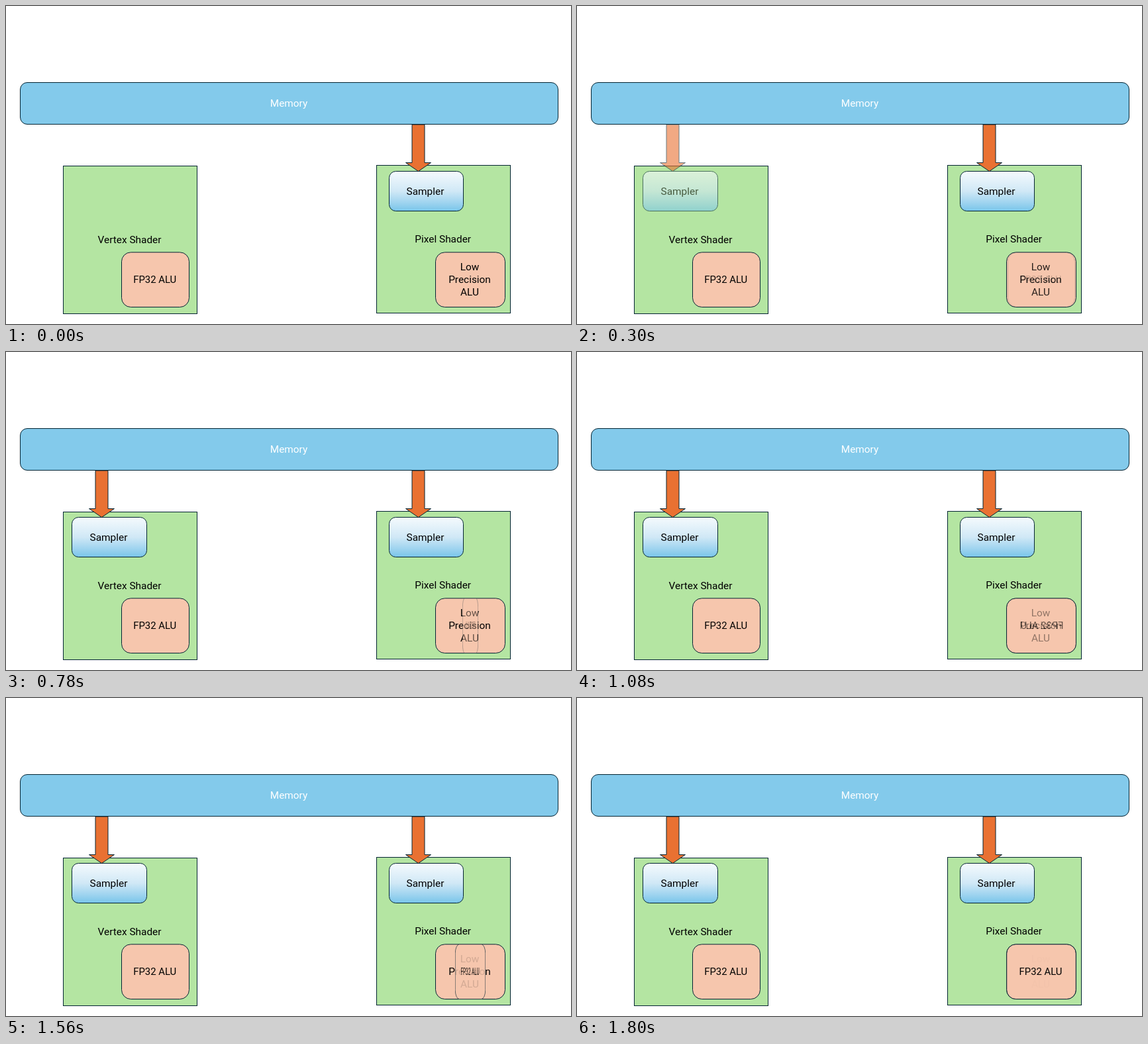
Recreate the animation shown at these times as an HTML page. Size 853 by 480 pixels, loop 1.86 s.

```html
<!DOCTYPE html>
<html lang="en">
<head>
<meta charset="utf-8">
<title>Shader pipeline</title>
<style>
  html, body { margin: 0; width: 100%; height: 100%; overflow: hidden; background: #fff; }
  svg { display: block; width: 853px; height: 480px; }
  rect, .arrow { stroke: #042433; stroke-width: 1; }
  text { font: 15.4px Roboto, "Open Sans", sans-serif; text-anchor: middle; fill: #000; }
  .alu-label { font-size: 14.9px; }
  .memory { fill: #83caeb; }
  .stage { fill: #b4e5a2; }
  .alu { fill: #f6c6ad; }
  .arrow { fill: #e97132; }
  .sampler { fill: url(#sky); }
  .light { fill: #fff; }
</style>
</head>
<body>
<svg viewBox="0 0 853 480">
  <defs>
    <linearGradient id="sky" x1="0" y1="0" x2="0" y2="1">
      <stop offset="0" stop-color="#f5fafd"/>
      <stop offset=".5" stop-color="#d0e8f6"/>
      <stop offset=".8" stop-color="#9dd3ef"/>
      <stop offset="1" stop-color="#78c5ea"/>
    </linearGradient>
    <path id="arrow" class="arrow" d="M-9.5 179H9.5V236.5H19L0 249.5L-19 236.5H-9.5Z"/>
  </defs>

  <rect class="memory" x="21.5" y="115.5" width="812" height="63" rx="10.5"/>
  <text class="light" x="427" y="152">Memory</text>

  <rect class="stage" x="86.5" y="241.5" width="202" height="223"/>
  <text x="186.5" y="358">Vertex Shader</text>
  <rect class="alu" x="174.5" y="371.8" width="102" height="82.7" rx="14"/>
  <text class="alu-label" x="224.7" y="418">FP32 ALU</text>

  <rect class="stage" x="559.5" y="240.5" width="202" height="223"/>
  <text x="659.7" y="357">Pixel Shader</text>
  <rect class="sampler" x="578.5" y="249.5" width="112" height="60" rx="10"/>
  <text x="633" y="285">Sampler</text>
  <use href="#arrow" x="622.5"/>

  <rect class="alu" x="648.5" y="371.8" width="105" height="82.7" rx="14"/>
  <text x="700" y="399">Low</text>
  <text x="700" y="418">Precision</text>
  <text x="700" y="437">ALU</text>

  <g id="fetch" opacity="0">
    <rect class="sampler" x="99.5" y="249.5" width="113" height="60" rx="10"/>
    <text x="155" y="285">Sampler</text>
    <use href="#arrow" x="144.5"/>
  </g>

  <g id="swivel" opacity="0">
    <rect class="alu" x="-52.5" y="371.8" width="105" height="82.7" rx="14"/>
    <text class="alu-label" x="-1" y="418">FP32 ALU</text>
  </g>
</svg>
<script>
  const LOOP = 1860, STEP = 60, FADE = 500, SWIVEL = 1820;
  const fetchPart = document.getElementById("fetch");
  const swivel = document.getElementById("swivel");
  const start = performance.now();

  function draw() {
    const time = (performance.now() - start) % LOOP;
    const t = Math.floor(time / STEP) * STEP;
    const turn = t / SWIVEL;
    // The card makes one and a quarter turns while it fades in.
    const width = Math.sin(2.5 * Math.PI * turn);
    fetchPart.setAttribute("opacity", Math.min(1, t / FADE));
    swivel.setAttribute("opacity", turn);
    swivel.setAttribute("transform", `translate(701 0) scale(${width.toFixed(4)} 1)`);
    requestAnimationFrame(draw);
  }
  draw();
</script>
</body>
</html>
```
